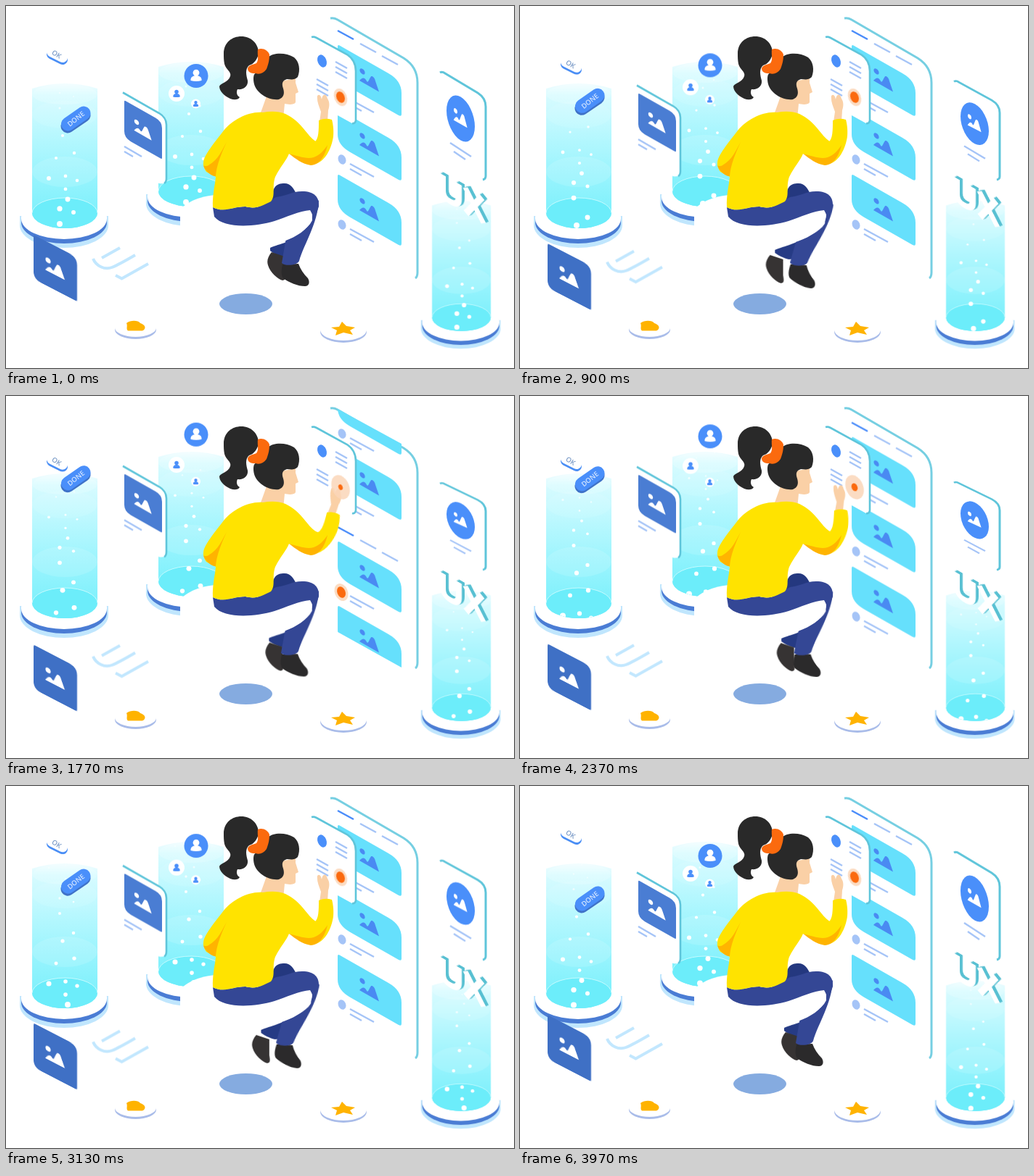
An HTML page that plays this animation: 700 px wide and 500 px high, repeating every 4.01 s.

```html
<!DOCTYPE html>
<html lang="en">
<head>
<meta charset="utf-8">
<title>Interface workshop</title>
<style>
html, body { margin: 0; width: 100%; height: 100%; overflow: hidden; background: #fff; }
svg { display: block; width: 700px; height: 500px; }
text { font-family: "Open Sans", Arial, sans-serif; font-size: 9.5px; font-weight: 600; text-anchor: middle; }
.line { fill: none; stroke: #a5c4f7; stroke-width: 2.4; }
.edge { fill: #fff; stroke: none; }
.rim { fill: none; stroke: #5fc5da; stroke-width: 3; }

/* floating parts: --y is the far end of the drift */
.sine, .fast, .slow { animation: sine 4010ms infinite; }
.fast { animation-name: fast; }
.slow { animation-name: slow; }
@keyframes sine {
  0%, 100% { transform: none; animation-timing-function: cubic-bezier(.37,0,.63,1); }
  50% { transform: translateY(var(--y)); animation-timing-function: cubic-bezier(.37,0,.63,1); }
}
@keyframes fast {
  0%, 100% { transform: none; animation-timing-function: cubic-bezier(.3,0,.45,1); }
  50% { transform: translateY(var(--y)); animation-timing-function: cubic-bezier(.55,0,.7,1); }
}
@keyframes slow {
  0%, 100% { transform: none; animation-timing-function: cubic-bezier(.5,0,.65,1); }
  50% { transform: translateY(var(--y)); animation-timing-function: cubic-bezier(.35,0,.5,1); }
}
.squash { transform-origin: 0 241px; animation: squash 4010ms cubic-bezier(.4,0,.6,1) infinite; }
@keyframes squash { 50% { transform: scaleY(.8); } }

.scroll { animation: scroll 4010ms infinite; }
@keyframes scroll {
  0%, 32.9% { transform: translateY(307px); animation-timing-function: cubic-bezier(.45,0,.2,1); }
  62.8%, 100% { transform: none; }
}
.arm { transform-origin: 425px 205px; animation: arm 4010ms cubic-bezier(.37,0,.63,1) infinite; }
@keyframes arm {
  0%, 26%, 64.5%, 100% { transform: none; }
  44.4% { transform: rotate(14deg); }
}
.halo, .core { transform-origin: 461px 126px; animation: halo 4010ms ease-in-out infinite; }
.core { animation-name: core; }
@keyframes halo {
  0%, 33%, 76%, 100% { transform: none; }
  44%, 59% { transform: scale(1.38); }
}
@keyframes core {
  0%, 33%, 76%, 100% { transform: none; }
  44% { transform: scale(.5); }
  59% { transform: scale(.72); }
}
.calf, .shin, .foot { animation: swing 2005ms cubic-bezier(.37,0,.63,1) infinite; }
.calf { transform-origin: 425px 278px; --end: translateY(5px) rotate(6.3deg); }
.shin { --end: translate(-13px, 3px); }
.foot { --end: translate(-22px, 4px); }
@keyframes swing { 50% { transform: var(--end); } }
</style>
</head>
<body>
<svg viewBox="0 0 700 500">
<defs>
  <linearGradient id="glow" x2="0" y2="1">
    <stop offset="0" stop-color="#f2fdff"/>
    <stop offset=".08" stop-color="#d8fbff"/>
    <stop offset=".4" stop-color="#b2f7fe"/>
    <stop offset=".7" stop-color="#92f3fd"/>
    <stop offset="1" stop-color="#74effb"/>
  </linearGradient>
  <clipPath id="glass"><path d="M36 107 H126 V286 A45 21 0 0 1 36 286Z"/></clipPath>
  <clipPath id="screen"><path d="M450 14 L545 66 V375 L450 322Z"/></clipPath>

  <g id="picture">
    <circle cx="-10" cy="-7" r="3.6"/>
    <path d="M-14 8 C-10 1 -7 -1 -4 3 C-2 5 -1 -1 2 -7 C4 -9 7 -8 8 -4 L13 8Z"/>
  </g>
  <g id="person">
    <circle cy="-3.8" r="4.4"/>
    <path d="M-7.5 7 C-8 2 -4 0 0 0 C4 0 8 2 7.5 7 Q0 9 -7.5 7Z"/>
  </g>

  <g id="tube">
    <path d="M19 290 V303 A61 31 0 0 0 141 303 V290Z" fill="#c0e6fd"/>
    <path d="M21 290 V299 A59 29 0 0 0 139 299 V290Z" fill="#4a7cd4"/>
    <path d="M21 291 V294 A59 28 0 0 0 139 294 V291 A59 28 0 0 0 21 291Z" fill="#fff"/>
    <path d="M36 114 Q81 100 126 114 V286 A45 21 0 0 1 36 286Z" fill="url(#glow)"/>
    <ellipse cx="81" cy="122" rx="45" ry="14" fill="#fff" opacity=".16"/>
    <ellipse cx="81" cy="150" rx="45" ry="19" fill="#fff" opacity=".08"/>
    <ellipse cx="81" cy="229" rx="45" ry="21" fill="#fff" opacity=".12"/>
    <ellipse cx="81" cy="286" rx="45" ry="21" fill="#6cedfa"/>
    <path d="M36 286 A45 21 0 0 1 126 286" fill="none" stroke="#c6fbff"/>
    <g id="bubbles" clip-path="url(#glass)" fill="#fff"></g>
  </g>

  <g id="item">
    <g transform="matrix(1 .57 0 1 0 0)">
      <path d="M0 3 Q0 0 3 0 H70 Q88 0 88 17 V46 Q88 50 84 50 H17 Q0 50 0 35Z" fill="#66e0fc"/>
      <use href="#picture" x="44" y="25" fill="#4a8af2"/>
    </g>
    <ellipse cx="6" cy="70" rx="5.2" ry="7" transform="rotate(-22 6 70)" fill="#a5c4f7"/>
    <path class="line" d="M17 76 l33 18 M17 83 l16 9"/>
  </g>
  <g id="list">
    <path class="line" d="M457 34 l22 12" style="stroke:#4a8cfa"/>
    <path class="line" d="M488 52 l22 12 M518 69 l22 12"/>
    <use href="#item" x="457" y="53"/>
    <use href="#item" x="457" y="142"/>
    <use href="#item" x="457" y="232"/>
    <ellipse cx="462" cy="124" rx="9" ry="12.5" transform="rotate(-22 462 124)" fill="#fbdcc2"/>
    <ellipse cx="462" cy="124" rx="5.6" ry="8" transform="rotate(-22 462 124)" fill="#fb6a0e"/>
  </g>
  <g id="ux" fill="none" stroke-width="8">
    <path d="M602 228 V248 Q602 259 613 259 Q624 259 624 248 V228"/>
    <path d="M633 228 L658 263 M656 228 L634 263"/>
  </g>
</defs>

<!-- rear tube, avatars and left card -->
<use href="#tube" x="174" y="-30"/>
<path d="M240 340 V281 C246 274 262 263 290 261 L320 340Z" fill="#fff"/>
<g class="slow" style="--y:-45px">
  <circle cx="262" cy="96.500" r="16.500" fill="#4a8ffa"/>
  <use href="#person" x="262" y="96" fill="#fff"/>
</g>
<g class="slow" style="--y:-27px">
  <circle cx="235" cy="121" r="11" fill="#fff"/>
  <use href="#person" transform="translate(235 121) scale(.63)" fill="#4a8ffa"/>
</g>
<g class="slow" style="--y:-17.5px">
  <circle cx="261.500" cy="135" r="6.500" fill="#fff"/>
  <use href="#person" transform="translate(261.500 135) scale(.5)" fill="#4a8ffa"/>
</g>
<g class="sine" style="--y:-23.500px">
  <path class="edge" d="M160 120 L213 149 Q221 154 221 164 V238 Q220 247 211 245 L160 215Z"/>
  <path class="rim" d="M161 119.500 L211 148 Q221 154 221 164 V238 Q221 243 218 245" style="stroke-width:2.6"/>
  <g transform="matrix(1 .57 0 1 163 130)">
    <path d="M0 2 Q0 0 2 0 H43 Q52 0 52 9 V50 Q52 52 50 52 H9 Q0 52 0 43Z" fill="#4a7dd3"/>
    <use href="#picture" transform="translate(26 27) scale(.9)" fill="#fff"/>
  </g>
  <path class="line" d="M163 194 l24 14 M163 201 l12 7"/>
</g>

<!-- front left -->
<use href="#tube"/>
<g class="fast" style="--y:-43px" stroke-linecap="round" stroke-width="19">
  <path d="M85 166 L107 151" stroke="#3f72c8"/>
  <path d="M85.500 163 L107 148" stroke="#4a8ffa"/>
  <text transform="translate(98.500 158.500) rotate(-39)" fill="#d3e5ff">DONE</text>
</g>
<g class="fast" style="--y:24px" stroke-linecap="round" stroke-width="14">
  <path d="M63 66.500 L78 74" stroke="#4a8ef5"/>
  <path d="M63 63.500 L78 71" stroke="#fff"/>
  <text transform="translate(68 69.500) rotate(32)" fill="#7c9cc8">OK</text>
</g>
<g class="sine" style="--y:28.500px">
  <g transform="matrix(1 .52 0 1 38 316)">
    <path d="M0 2 Q0 0 2 0 H48 Q60 0 60 11 V59 Q60 61 58 61 H11 Q0 61 0 51Z" fill="#3f70c5"/>
    <use href="#picture" x="30" y="32" fill="#fff"/>
  </g>
</g>
<g class="sine" style="--y:11px" fill="none" stroke="#c2e7fe" stroke-width="4">
  <path d="M132 348 L157 334 M120 349 C124 359 136 365 146 361 C154 358 166 351 178 344 M151 372 L159.500 376.500 L196 356"/>
</g>

<!-- tokens and ground shadow -->
<ellipse cx="178.500" cy="447" rx="28.500" ry="13" fill="#a9bce9"/>
<ellipse cx="178.500" cy="444.500" rx="28.500" ry="12.500" fill="#fff"/>
<path d="M166 438 C172 433.500 182 434 185 438 C192 440 194 446 188 448.500 H168 C165 446 168 442 166 438Z" fill="#ffb300"/>
<ellipse cx="465" cy="450" rx="32" ry="15" fill="#a9bce9"/>
<ellipse cx="465" cy="447.500" rx="32" ry="14.500" fill="#fff"/>
<path d="M463 436 L469 442 L481 444 L474 448 L478 454 L465 451 L454 455 L456 448 L448 444 L459 443Z" fill="#ffb300"/>
<ellipse cx="330.500" cy="411.500" rx="36.500" ry="14.500" fill="#85abe0"/>

<!-- tablet -->
<path class="rim" d="M447 17 Q452 16 457 19 L548 72 Q567 84 567 106 V368 Q567 374 564 376" style="stroke:#76cfe2"/>
<g clip-path="url(#screen)">
  <g class="scroll">
    <use href="#list"/>
    <use href="#list" y="-307"/>
  </g>
</g>

<!-- popup -->
<path class="edge" d="M419 43 H426 L470 67 Q482 75 482 90 V158 Q481 165 475 161 L419 130Z"/>
<path class="rim" d="M421 43 Q424 42 428 44 L470 67 Q482 75 482 90 V158 Q481 163 477 162" style="stroke-width:2.6"/>
<ellipse cx="435.500" cy="76" rx="6" ry="9" transform="rotate(-22 435.500 76)" fill="#4a8ffa"/>
<path class="line" d="M454 77 l16 9 m-16 -2 l16 9 m-16 -2 l16 9 M428 101 l16 9 m-16 -2 l16 9 m-16 -2 l16 9"/>

<!-- woman -->
<path d="M366 268 C367 250 372 245 384 245 C392 245 397 252 401 262Z" fill="#24387f"/>
<path class="shin" d="M364 334 C372 330 392 326 410 315 L405 345 L383 347 C375 345 368 341 364 338Z" fill="#263b85"/>
<path class="foot" d="M366 340 C361 346 359 352 361 358 C364 368 374 377 381 379 C386 379 385 374 384 368 L384 346Z" fill="#363333"/>
<g class="calf">
  <path d="M381 357 C379 366 379 372 382 376 C390 382 402 387 412 387 C418 387 419 381 416 376 C410 370 406 364 403 356Z" fill="#2b2a2b"/>
  <path d="M421 280 L431 268 C430 300 410 330 404 352 C402 358 385 360 380 355 L386 320 C400 316 415 310 422 296Z" fill="#344795"/>
</g>
<path d="M340 303 C370 301 400 282 421 281 C427 300 408 322 358 331.500Z" fill="#fff"/>
<path d="M285 278 C300 286 312 277 330 277 C345 281 352 276 365 268 L372 264 C385 263 394 256 408 256 C425 256 432 264 431 277 L423 300 C424 292 422 287 419 282 C405 283 385 292 370 297 C340 306 300 307 287 291Z" fill="#344795"/>

<path d="M378 104 L399 100 L399 106 L403 119 L399 121 L399 133 C397 137 388 136 384 135 L382 156 L350 150 L360 122Z" fill="#fad0a6"/>
<path d="M361 71 C368 64 386 64 397 71 C404 77 406 88 402 98 C397 103 392 101 387 101 C380 103 380 108 382 114 C384 121 383 126 376 129 C362 131 345 120 342 108 C340 100 341 92 345 93 C354 92 360 86 361 71Z" fill="#292929"/>
<path d="M300 66 C300 50 312 42 324 42 C338 42 348 52 348 65 C347 73 342 80 335 82 C329 87 331 96 333 103 C334 111 327 116 319 115 C317 119 318 124 322 126 C320 130 314 130 309 128 C300 124 294 117 294 111 C296 106 306 106 309 97 C311 91 303 88 301 80 C300 75 300 70 300 66Z" fill="#292929"/>
<path d="M347 60 C353 57 361 61 363 67 C363 74 362 79 359 87 C355 93 349 95 344 93 C340 93 334 93 333 87 C333 82 340 81 345 79 C349 74 346 68 347 60Z" fill="#fb6a0e"/>

<path d="M354 147 C335 145 312 157 300 172 C288 188 273 205 272 216 Q271 222 276 229 L289 236 C288 248 284 262 285 278 C300 286 312 277 330 277 C345 281 352 276 365 270 C372 262 366 250 371 236 C378 222 386 214 390 204 L420 218 L438 192 L427 187 C415 180 408 160 385 149 C375 145 365 145 354 147Z" fill="#ffe300"/>
<path d="M304 188 C297 200 293 212 279 220 C276 222 273 221 272 220 C274 228 284 236 289 235 C290 220 297 203 304 188Z" fill="#ffb400"/>
<g class="arm">
  <path d="M432 160 L434 146 C431 138 428 131 429 124 C432 121 434 124 435 129 C436 121 441 120 443 128 C446 132 446 138 444 144 L443 160Z" fill="#fad0a6"/>
  <path d="M431 158 C431 172 431 184 425 188 L405 203 L420 219 C440 219 449 195 451 180 C452 170 450 160 449 157 Q440 154 431 158Z" fill="#ffe300"/>
</g>
<path d="M390 204 C402 207 414 212 424 209 C432 206 438 200 443 192 C440 206 432 220 420 220 C408 218 399 211 390 204Z" fill="#ffb400"/>

<g transform="rotate(-22 461 126)">
  <ellipse class="halo" cx="461" cy="126" rx="8.600" ry="12.600" fill="#fad6b8" opacity=".85"/>
  <ellipse class="core" cx="461" cy="126" rx="5.600" ry="8" fill="#fb6a0e"/>
</g>

<!-- right side -->
<g class="squash">
  <path class="rim" d="M598 92 Q601 90 605 93 L650 120 Q661 127 661 139 V235 Q661 239 657 240"/>
  <g transform="matrix(1 .57 0 1 626.500 155.500)">
    <ellipse rx="19.500" ry="30" fill="#4a8ffa"/>
    <use href="#picture" transform="scale(.7 .95)" fill="#fff"/>
  </g>
  <path class="line" d="M612 189 l29 19 M617 201 l16 11"/>
</g>
<use href="#tube" transform="translate(554.600 172.800) scale(.9)"/>
<g class="sine" style="--y:12px">
  <g transform="matrix(1 .57 0 1 0 -338)">
    <use href="#ux" x="4" y="-4" stroke="#58c0d2"/>
    <use href="#ux" x="2.700" y="-2.700" stroke="#58c0d2"/>
    <use href="#ux" x="1.300" y="-1.300" stroke="#58c0d2"/>
    <use href="#ux" stroke="#fff"/>
  </g>
</g>
</svg>
<script>
const LOOP = 4010, RISE = 160, TOP = 108;
// x, height at loop start, relative size
const seeds = [
  [59, 238, 1], [82, 235, .8], [98, 241, .75], [82, 253, .75], [85, 267, 1], [74, 280, 1],
  [93, 285, .8], [69, 210, .8], [94, 203, .9], [78, 179, 1], [93, 168, .9], [74, 141, 1]
];
const layer = document.getElementById('bubbles');
const bubbles = seeds.flatMap(([x, y, size]) => [-1, 0, 1, 2].map(lap => {
  const dot = document.createElementNS('http://www.w3.org/2000/svg', 'circle');
  dot.setAttribute('cx', x);
  layer.append(dot);
  return { dot, y: y + lap * RISE, size };
}));

function draw() {
  const p = performance.now() % LOOP / LOOP;
  for (const { dot, y, size } of bubbles) {
    const cy = y - p * RISE;
    const h = (cy - TOP) / 190;
    const shown = h > 0 && h < 1.1;
    dot.setAttribute('cy', cy.toFixed(2));
    dot.setAttribute('r', shown ? (size * (1 + 2.9 * h)).toFixed(2) : 0);
    dot.setAttribute('opacity', shown ? Math.min(1, .35 + h * 1.6).toFixed(2) : 0);
  }
  requestAnimationFrame(draw);
}
draw();
</script>
</body>
</html>
```
